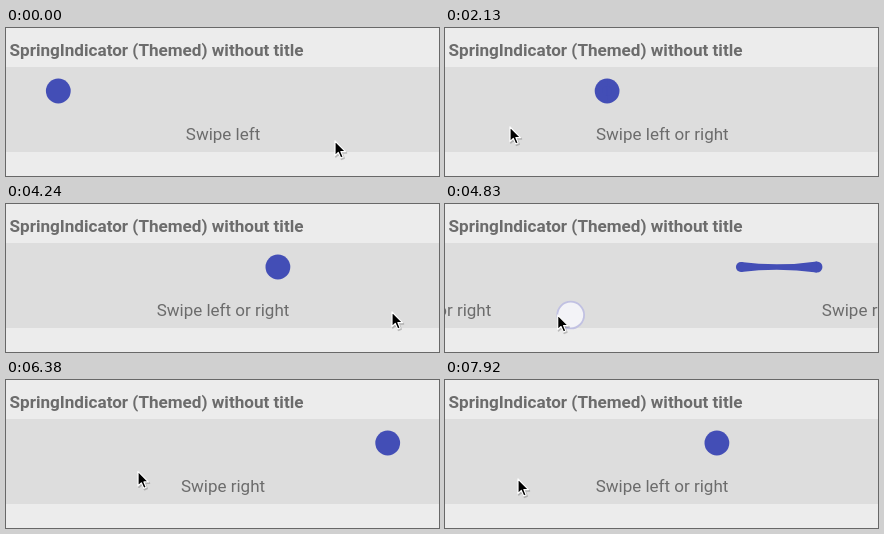
Recreate the animation shown at these times as an HTML page. Size 433 px wide and 148 px high, loop 8000 ms.

```html
<!DOCTYPE html>
<html lang="en">
<head>
<meta charset="utf-8">
<title>Spring indicator</title>
<style>
  html, body { margin: 0; width: 100%; height: 100%; overflow: hidden; background: #ececec; }
  svg { display: block; }
  text { font: 17px Roboto, sans-serif; fill: #6c6c6c; }
  .title { font-weight: 700; font-size: 17.11px; }
  .pages { text-anchor: middle; }
</style>
</head>
<body>
<svg width="433" height="148" viewBox="0 0 433 148">
  <rect width="433" height="148" fill="#ececec"/>
  <rect y="39" width="433" height="85" fill="#ddd"/>
  <text class="title" x="3.5" y="28">SpringIndicator (Themed) without title</text>
  <g class="pages" id="pages"></g>
  <g fill="#434eb6">
    <circle id="head" cy="63"/>
    <circle id="foot" cy="63"/>
    <path id="spring"/>
  </g>
  <circle id="touch" r="13.4" fill="#f3f3f7" stroke="#c1c1e2" stroke-width="1.8"/>
  <g id="cursor" stroke-linejoin="round">
    <path d="M.8 1.5V16l3.3-3 2.4 5.4 2.7-1.1L7 12h4.5z" opacity=".2" stroke="#000" stroke-width="1.5"/>
    <path d="M0 0V14.6L3.3 11.5 5.7 17 8.2 15.9 5.9 10.6H10.5Z" stroke="#fff" stroke-width="1.2"/>
  </g>
</svg>
<script>
const LOOP = 8000, STEP = 117, PITCH = 439;
const DOT_X = 52.3, DOT_GAP = 109.8, R_MIN = 5, R_MAX = 12.4;
const HOLD = 2, SETTLED = 8, DECAY = .32;   // drag phases, in steps

// Each move leads the cursor from where it is to x, y.
// page: page swiped to, pull: share of it dragged by hand, lag: touch dot behind the cursor
const moves = [
  { at: 363,  steps: 5, x: 365, y: 113 },
  { at: 1300, steps: 2.25, x: 65, y: 99, arc: 9, page: 1, pull: .78, lag: 13 },
  { at: 2130, steps: 6, x: 360, y: 111 },
  { at: 2950, steps: 2.25, x: 81, y: 112, page: 2, pull: .52, lag: 14 },
  { at: 3760, steps: 4, x: 386, y: 108 },
  { at: 4590, steps: 2.25, x: 103, y: 109, arc: 6, page: 3, pull: .54, lag: 13 },
  { at: 5303, steps: 1, x: 331, y: 108 },
  { at: 5420, steps: 2, x: 395, y: 107 },
  { at: 5783, steps: 7, x: 67, y: 107, arc: -20 },
  { at: 6740, steps: 2.25, x: 315, y: 107, page: 2, pull: .399, lag: -22 },
  { at: 7091, steps: 3, x: 270, y: 102 },
  { at: 7453, steps: 4, x: 73, y: 99 }
];

const $ = id => document.getElementById(id);
const set = (id, attrs) => { for (const k in attrs) $(id).setAttribute(k, attrs[k]); };
const lerp = (a, b, u) => a + (b - a) * u;
const clamp = u => Math.max(0, Math.min(1, u));
const smooth = u => u * u * (3 - 2 * u);
const stepOf = (t, at) => Math.floor((t - at + 5) / STEP);

const labels = ['Swipe left', 'Swipe left or right', 'Swipe left or right', 'Swipe right'].map(s => {
  const el = document.createElementNS('http://www.w3.org/2000/svg', 'text');
  el.textContent = s;
  el.setAttribute('y', 112);
  return $('pages').appendChild(el);
});

// Accelerates under the finger, then glides to the page after release
function swipe(step, pull) {
  if (step <= HOLD) return pull * (step / HOLD) ** 2;
  return step < SETTLED ? 1 - (1 - pull) * DECAY ** (step - HOLD) : 1;
}

function stateAt(t) {
  const s = { x: 329, y: 113, page: 0, touch: null };
  for (const m of moves) {
    const step = stepOf(t, m.at);
    if (step < 0) break;
    const u = clamp(step / m.steps), e = smooth(u);
    s.x = lerp(s.x, m.x, e);
    s.y = lerp(s.y, m.y, e) + (m.arc || 0) * Math.sin(Math.PI * u);
    if (m.pull) {
      s.page = lerp(s.page, m.page, swipe(step, m.pull));
      s.touch = step <= HOLD ? s.x + m.lag * step / HOLD : null;
    }
  }
  return s;
}

// Arctangent ease used for both ends of the spring
const springEase = u => (Math.atan(clamp(u) - .5) / Math.atan(.5) + 1) / 2;

function drawSpring(page) {
  const base = Math.floor(page), f = page - base;
  const x = e => DOT_X + DOT_GAP * (base + e);
  const hx = x(springEase(f / .6)), fx = x(springEase((f - .4) / .6));
  const hr = lerp(R_MIN, R_MAX, clamp(f * 2 - 1));
  const fr = lerp(R_MAX, R_MIN, clamp(f * 2));
  const mid = `${(hx + fx) / 2} 63`;
  set('head', { cx: hx, r: hr });
  set('foot', { cx: fx, r: fr });
  set('spring', {
    d: `M${fx} ${63 - fr}Q${mid} ${hx} ${63 - hr}V${63 + hr}Q${mid} ${fx} ${63 + fr}Z`
  });
}

function draw(t) {
  const s = stateAt(t);
  labels.forEach((el, i) => el.setAttribute('x', 217 + (i - s.page) * PITCH));
  drawSpring(s.page);
  set('cursor', { transform: `translate(${s.x} ${s.y})` });
  set('touch', { cx: s.touch ?? 0, cy: s.y, visibility: s.touch === null ? 'hidden' : 'visible' });
}

const start = performance.now();
function tick() {
  draw((performance.now() - start) % LOOP);
  requestAnimationFrame(tick);
}
tick();
</script>
</body>
</html>
```
